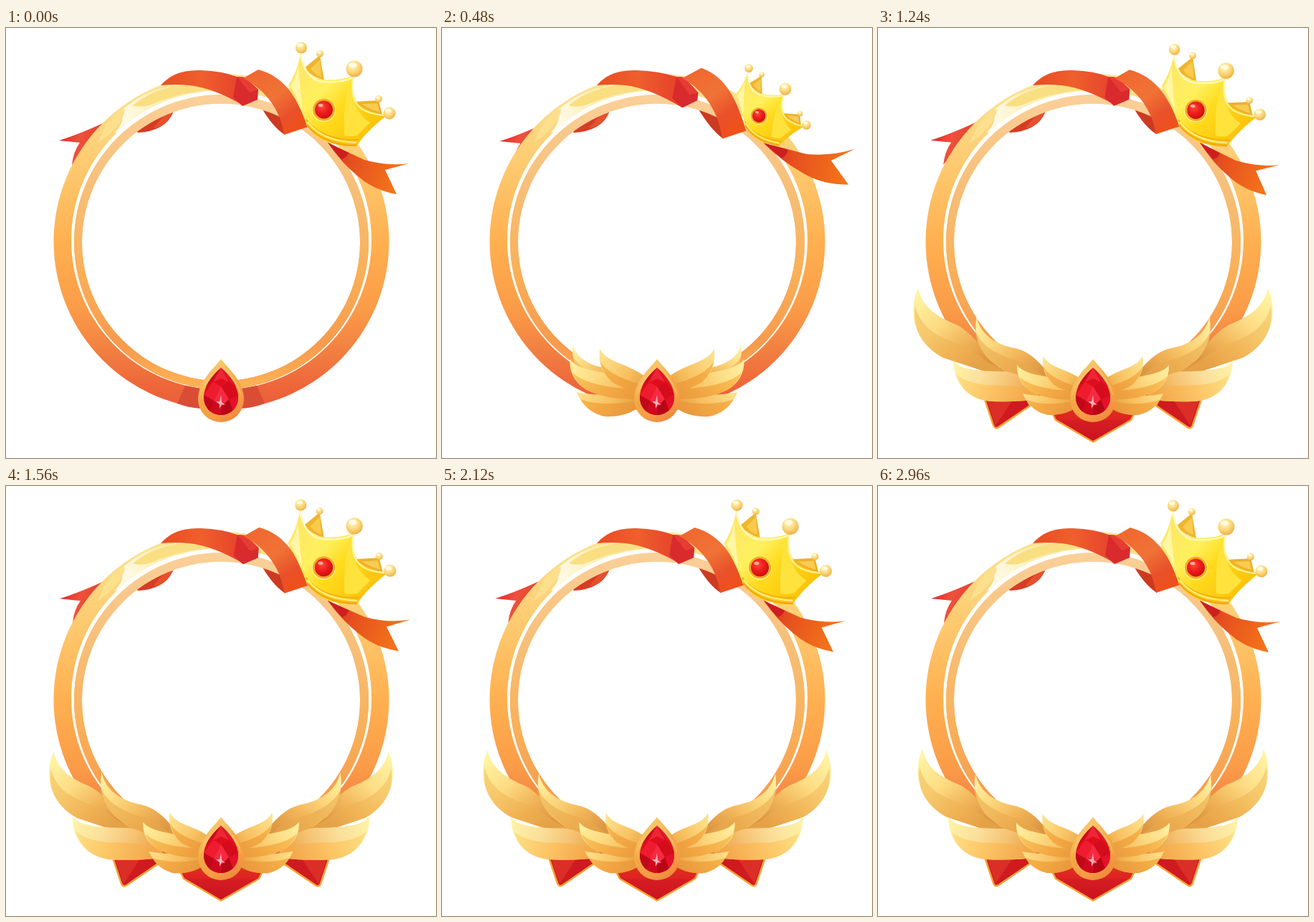
Write an HTML page that moves like this. It is 600 by 600 pixels and loops after 3 s.

```html
<!DOCTYPE html>
<html lang="en">
<head>
<meta charset="utf-8">
<title>Crowned ring</title>
<style>
  html, body { margin: 0; width: 100%; height: 100%; overflow: hidden; background: #fff; }
  svg { display: block; width: 100vw; height: 100vh; }
</style>
</head>
<body>
<svg id="stage" viewBox="0 0 600 600"></svg>
<script>
const LOOP = 3000, STEP = 40;
const stage = document.getElementById('stage');

// Gradient on absolute coordinates; stops are [offset, colour]
const grad = (name, x1, y1, x2, y2, ...stops) =>
  `<linearGradient id="fill-${name}" gradientUnits="userSpaceOnUse" x1="${x1}" y1="${y1}" x2="${x2}" y2="${y2}">` +
  stops.map(([o, c]) => `<stop offset="${o}" stop-color="${c}"/>`).join('') + '</linearGradient>';
const use = name => `url(#fill-${name})`;
const path = (d, fill, more = '') => `<path d="${d}" fill="${fill}" ${more}/>`;
const ball = (x, y, r) => `<circle cx="${x}" cy="${y}" r="${r}" fill="${use('ball')}"/>` +
  `<ellipse cx="${x - r * .2}" cy="${y - r * .45}" rx="${r * .5}" ry="${r * .3}" fill="#fffbe0"/>`;
const pair = (id, art) => `<g id="${id}L">${art}</g><g id="${id}R">${art}</g>`;

const defs = '<defs>' +
  grad('ring', 0, 64, 0, 532, [0, '#fbe693'], [.18, '#fdd47c'], [.5, '#ffb050'], [.7, '#fb9c48'], [.85, '#f07a40'], [.93, '#ee6639'], [1, '#ea5d3a']) +
  grad('rim', 0, 92, 0, 504, [0, '#fbd09a'], [.3, '#f6c07a'], [.6, '#f9b059'], [.85, '#f79a4d'], [1, '#ffb455']) +
  grad('pale', 150, 135, 290, 82, [0, '#fffdf2'], [.35, '#fdf3c8'], [1, '#fbe38c']) +
  grad('back', 216, 0, 331, 0, [0, '#ea4c22'], [.5, '#ef5f2d'], [1, '#e5402b']) +
  grad('strip', 345, 60, 405, 145, [0, '#f0682f'], [.45, '#f07236'], [.75, '#e9512a'], [1, '#f05019']) +
  grad('tailL', 78, 150, 125, 165, [0, '#e42a2c'], [.5, '#f0503c'], [1, '#e2452c']) +
  grad('tailR', 452, 165, 550, 205, [0, '#d82c20'], [.35, '#e6501f'], [1, '#f3741a']) +
  grad('crown', 405, 60, 500, 150, [0, '#ffe766'], [.35, '#fff05e'], [.6, '#ffdb1c'], [1, '#fbc40c']) +
  grad('gold', 272, 470, 325, 550, [0, '#fbd176'], [.45, '#f3a844'], [.75, '#f79a45'], [1, '#e9813a']) +
  grad('outer', 62, 370, 150, 470, [0, '#fff6a6'], [.4, '#fddc84'], [.7, '#f2b65a'], [1, '#dd9440']) +
  grad('mid', 136, 405, 215, 490, [0, '#fff5a8'], [.35, '#fcd77d'], [.65, '#f3b75a'], [1, '#dd9642']) +
  grad('low', 98, 465, 205, 510, [0, '#fff4a8'], [.4, '#fbdf9a'], [.75, '#f6c272'], [1, '#eba84e']) +
  grad('lowEdge', 98, 480, 205, 520, [0, '#fde387'], [.5, '#fcc566'], [1, '#f3a749']) +
  grad('inner', 195, 465, 275, 515, [0, '#fff2a4'], [.4, '#fddc84'], [.75, '#f8c060'], [1, '#e9a446']) +
  grad('innerEdge', 195, 480, 275, 530, [0, '#fbc95f'], [.5, '#f4ac46'], [1, '#e8963a']) +
  grad('banner', 0, 530, 0, 580, [0, '#e0301f'], [.36, '#dd2222'], [.38, '#d51d22'], [1, '#c9121f']) +
  '<radialGradient id="fill-ball" cx=".4" cy=".3" r=".75"><stop offset="0" stop-color="#fff8d0"/>' +
  '<stop offset=".5" stop-color="#fcda7c"/><stop offset="1" stop-color="#efab44"/></radialGradient>' +
  '<radialGradient id="fill-ruby" cx=".4" cy=".35" r=".7"><stop offset="0" stop-color="#ff4a3a"/>' +
  '<stop offset=".5" stop-color="#ee1c1c"/><stop offset="1" stop-color="#c4100f"/></radialGradient>' +
  '<clipPath id="drop"><path d="M300 474C310 483 324 498 324 515C324 530 313 540 300 540C287 540 276 530 276 515C276 498 290 483 300 474Z"/></clipPath></defs>';

const hole = 'M106 299a194 193.500 0 1 1 388 0a194 193.500 0 1 1 -388 0Z';
const cut = 'fill-rule="evenodd"';
const ring =
  path('M66.500 298a234 234 0 1 0 468 0a234 234 0 1 0 -468 0Z' + hole, use('ring'), cut) +
  path('M160 116C185 94 215 79 258 78L300 84C250 90 212 108 178 142L152 146Q168 128 160 116Z', use('pale')) +
  path('M177 108Q210 80 262 79L292 85Q240 90 205 106Q190 112 177 108Z', '#f9df82') +
  path('M139 136Q152 116 166 113Q166 128 140 152L128 160Z', '#fce08e') +
  path('M91 296a209.500 209 0 1 0 419 0a209.500 209 0 1 0 -419 0ZM95 298.500a205.500 205.500 0 1 1 411 0a205.500 205.500 0 1 1 -411 0Z', '#fffefa', cut) +
  path('M95 298.500a205.500 205.500 0 1 0 411 0a205.500 205.500 0 1 0 -411 0Z' + hole, use('rim'), cut) +
  path('M239 524L250 499L272 503V531Q255 530 239 524Z', '#d94d35') +
  path('M361 524L350 499L328 503V531Q345 530 361 524Z', '#d94d35');

const crown =
  path('M438 38L416 56Q428 69 444 73Z', '#f0b52e') +
  path('M438 44L425 57Q432 66 440 68Z', '#f9cb4c') +
  path('M520 101L485 103Q505 118 525 121Z', '#eeb02a') +
  path('M518 105L496 106Q508 114 521 117Z', '#f8cc50') +
  ball(438, 36, 5) + ball(520, 99, 5) +
  path('M411 34C414 55 425 71 443 72C462 73 475 71 485 66C482 90 486 105 500 112C512 119 522 121 534 120C518 132 500 148 489 165C465 166 435 160 420 137C414 118 404 98 394 80C402 68 409 50 411 34Z', use('crown')) +
  path('M411 36C414 57 425 74 443 75C462 76 475 74 484 69', 'none', 'stroke="#fff9b8" stroke-width="2.500"') +
  path('M484 70C481 92 486 108 500 115Q512 121 530 122', 'none', 'stroke="#fff6a0" stroke-width="2"') +
  path('M408 52C406 66 401 76 397 81Q406 96 414 117Q410 85 408 52Z', '#fff7a6') +
  path('M480 74Q470 105 472 150Q482 152 490 150Q500 140 508 132Q484 118 480 74Z', '#ffe23c') +
  path('M419 128C434 149 462 157 492 156', 'none', 'stroke="#f5ab12" stroke-width="1.800"') +
  path('M420 135C436 156 464 164 489 164', 'none', 'stroke="#f2a516" stroke-width="2.500"') +
  path('M421 131C437 152 462 159 489 160', 'none', 'stroke="#fff08a" stroke-width="2"') +
  '<circle cx="443.500" cy="114.500" r="16.500" fill="#fff0a0"/><circle cx="443.500" cy="114" r="15.500" fill="#f3ad1c"/>' +
  `<circle cx="443.500" cy="114" r="12.500" fill="${use('ruby')}"/><ellipse cx="439" cy="108" rx="3.500" ry="2.200" fill="#ffb0a0"/>` +
  ball(412, 27.5, 8) + ball(486, 57, 11.5) + ball(535, 119, 8.5);

const gem =
  path('M300 462C310 475 332 493 332 518A32 32 0 0 1 268 518C268 493 290 475 300 462Z', use('gold')) +
  path('M300 466C309 478 326 495 328 513Q320 490 300 472Q280 490 272 513C274 495 291 478 300 466Z', '#f9c46c') +
  '<g clip-path="url(#drop)"><rect x="270" y="470" width="60" height="75" fill="#df0e1e"/>' +
  path('M300 472L288 492L274 505L284 486Z', '#c50c1a') +
  path('M300 472L312 492L326 505L316 486Z', '#e01a2a') +
  path('M300 474L289 494L300 489L311 494Z', '#ec2636') +
  path('M289 494L276 512L290 520L300 500Z', '#ee1c2e') +
  path('M311 494L325 512L311 518L300 500Z', '#d40c1c') +
  path('M276 512L290 520L285 536L274 522Z', '#c00818') +
  path('M325 512L311 518L317 535L328 522Z', '#e4102a') +
  path('M290 520L300 500L311 518L301 528Z', '#f52a40') +
  path('M290 520L301 528L300 542L285 536Z', '#cf0a1e') +
  path('M301 528L311 518L317 535L300 542Z', '#b80616') + '</g>' +
  path('M300 512L301 522L306 526L301 525L298 531L298 525L293 521L298 521Z', '#ffb0b6');

const outer = path('M62 367C68 396 92 408 114 417Q134 427 160 462L226 488L212 500Q150 480 96 462C62 444 50 412 58 378Z', use('outer')) +
  path('M58 392Q66 426 108 440Q130 448 154 466L212 500Q150 480 96 462C66 446 54 420 58 392Z', '#eeb04e', 'opacity=".45"');
const mid = path('M136 402C142 428 164 441 190 446Q214 451 236 480L238 500H212Q180 484 154 462Q130 438 136 402Z', use('mid')) +
  path('M134 420Q142 446 182 460Q214 468 232 488L236 500H212Q190 488 168 472Q134 450 134 420Z', '#e9a94c', 'opacity=".55"');
const low = path('M98 462C106 474 128 478 174 478Q196 481 212 496L224 518Q190 523 150 521C116 517 99 494 98 462Z', use('low')) +
  path('M103 483Q122 498 160 498Q190 498 218 506L224 518Q190 523 150 521C122 518 108 500 103 483Z', use('lowEdge'));
const inner =
  path('M201 510Q232 517 278 508V528Q262 541 236 540Q212 535 201 510Z', use('inner')) +
  path('M206 519Q236 529 278 520V528Q262 541 236 540Q215 535 206 519Z', use('innerEdge')) +
  path('M193 470C206 486 238 484 280 496V518Q240 521 213 507Q192 494 193 470Z', use('inner')) +
  path('M196 486Q214 504 280 507V518Q240 521 213 507Q200 498 196 486Z', use('innerEdge')) +
  path('M230 457C238 474 262 474 284 490V512Q262 508 245 498Q226 482 230 457Z', use('inner')) +
  path('M230 472Q240 490 282 501V512Q262 508 245 498Q233 487 230 472Z', use('innerEdge'));

const edge = 'stroke="#f6a236" stroke-width="2.500" stroke-linejoin="round"';
const flag = path('M149 518L161 554Q163 560 168 557L212 527L205 512Z', '#cf1a20', edge) +
  path('M152 519L164 555L188 519Z', '#e2372a', 'opacity=".7"');
const banner = path('M243 528V538L248 548L300 578.500L353 548L358 538V528Z', use('banner'), edge);

stage.innerHTML = defs +
  `<g id="tailL">${path('M74 157Q106 147 150 126L158 140L110 172L92 191Q94 172 103 160Z', use('tailL'))}</g>` +
  path('M178 138L225 112L233 118Q222 144 184 146Z', '#d63c25') +
  path('M205 140Q215 128 226 115L233 118Q224 138 205 140Z', '#e5502e') +
  path('', '#cd3a22', 'id="under"') + ring +
  path('', use('back'), 'id="back"') + path('', '#d92a2e', 'id="fold"') +
  path('', '#e63c34', 'id="crease"') + path('', use('strip'), 'id="strip"') +
  `<g id="tailR">${path('M449 160Q474 172 500 184Q532 193 562 189L529 198L545 232Q512 226 490 206Q468 188 449 160Z', use('tailR'))}` +
  path('M449 160L478 174Q474 182 468 183Z', '#cc1f1f') + '</g>' +
  `<g id="crown">${crown}</g>` +
  pair('flag', flag) + `<g id="banner">${banner}</g>` +
  pair('outer', outer) + pair('mid', mid) + pair('low', low) + pair('inner', inner) + gem;

const el = id => document.getElementById(id);

// Turning points [ms, value], joined by cosine easing
const keys = {
  crown: [[0, 0], [430, -1.02], [980, .17], [1240, -.09], [1450, .07], [1740, -.04], [2040, .03], [2340, -.015], [3000, 0]],
  ribbon: [[0, 0], [600, 1.2], [1200, -.15], [1480, .2], [1760, -.1], [2060, .06], [2360, -.03], [3000, 0]],
  inner: [[20, 0], [440, 1.15], [660, .98], [880, 1.035], [1200, .988], [1500, 1.02], [1800, .99], [2100, 1.015], [2400, .995], [3000, 1]],
  mid: [[160, 0], [690, 1.08], [1150, .985], [1480, 1.02], [1800, .99], [2100, 1.006], [3000, 1]],
  low: [[280, 0], [800, 1.08], [1200, .963], [1520, 1.03], [1820, .985], [2120, 1.01], [2440, .995], [3000, 1]],
  outer: [[240, 0], [1130, 1.04], [1480, .975], [1800, 1.018], [2120, .993], [2440, 1.007], [3000, 1]],
  flag: [[800, 0], [1100, 1.06], [1260, 1], [1420, 1.04], [1600, 1], [3000, 1]],
  banner: [[480, -50], [1000, 6], [1240, -1], [1400, 4.5], [1560, 0], [1800, 3.5], [2120, 0], [2400, 2], [3000, 0]]
};

function at(list, t) {
  const i = list.findIndex(k => k[0] > t);
  if (i === 0) return list[0][1];
  if (i < 0) return list[list.length - 1][1];
  const [t0, a] = list[i - 1], [t1, b] = list[i];
  return a + (b - a) * (1 - Math.cos(Math.PI * (t - t0) / (t1 - t0))) / 2;
}

// Scales a left part and its mirrored twin about (x, y)
function grow(id, s, x, y) {
  for (const [side, m] of [['L', 1], ['R', -1]]) {
    const g = el(id + side);
    g.style.display = s > .01 ? '' : 'none';
    const px = m > 0 ? x : 600 - x;
    g.setAttribute('transform', `translate(${px} ${y}) scale(${m * s} ${s}) translate(${-x} ${-y})`);
  }
}

const turn = (id, x, y, angle, s) =>
  el(id).setAttribute('transform', `translate(${x} ${y}) rotate(${angle}) scale(${s}) translate(${-x} ${-y})`);

function ribbon(w) {
  const set = (id, d) => el(id).setAttribute('d', d);
  set('under', `M350 108L386 116L${389 + 3 * w} ${149 + 5 * w}Q${372 + 3 * w} ${138 + 4 * w} 357 112Z`);
  set('back', `M216 80C232 62 250 59 272 59Q302 60 ${322 + 5 * w} 68L${331 + 4 * w} ${108 + 3 * w}Q290 84 256 80Q235 78 216 80Z`);
  set('fold', `M${322 + 5 * w} 68L${334 + 4 * w} 69L${352 + 5 * w} ${86 + 4 * w}L${351 + 5 * w} ${100 + w}L${330 + 5 * w} ${109 + 2 * w}L${317 + 4 * w} ${97 + w}Z`);
  set('crease', `M${322 + 5 * w} 68L${334 + 4 * w} 69L${352 + 5 * w} ${86 + 4 * w}L${340 + 5 * w} ${90 + 3 * w}Z`);
  set('strip', `M${331 + 4 * w} 70L${352 + 9 * w} ${58 - 2 * w}C${390 + 6 * w} 68 ${408 + 3 * w} 100 ${421 + 3 * w} ${138 + 5 * w}L${388 + 3 * w} ${149 + 5 * w}C${384 + 2 * w} 118 ${365 + 2 * w} 88 ${331 + 4 * w} 70Z`);
  turn('tailR', 452, 160, -10 * w, 1 + .09 * w);
  el('tailL').setAttribute('transform', `translate(${6 * w} ${w})`);
}

function draw(t) {
  const v = {};
  for (const k in keys) v[k] = at(keys[k], t);
  turn('crown', 429, 140, -8 * v.crown, 1 + .265 * v.crown);
  ribbon(v.ribbon);
  grow('inner', v.inner, 300, 525);
  grow('mid', v.mid, 300, 540);
  grow('low', v.low, 300, 512);
  grow('outer', v.outer, 300, 545);
  grow('flag', v.flag, 200, 505);
  el('banner').style.display = t >= 560 ? '' : 'none';
  el('banner').setAttribute('transform', `translate(0 ${v.banner})`);
}

const start = performance.now();
function tick() {
  const t = (performance.now() - start) % LOOP;
  draw(Math.floor(t / STEP) * STEP);
  requestAnimationFrame(tick);
}
draw(0);
requestAnimationFrame(tick);
</script>
</body>
</html>
```
